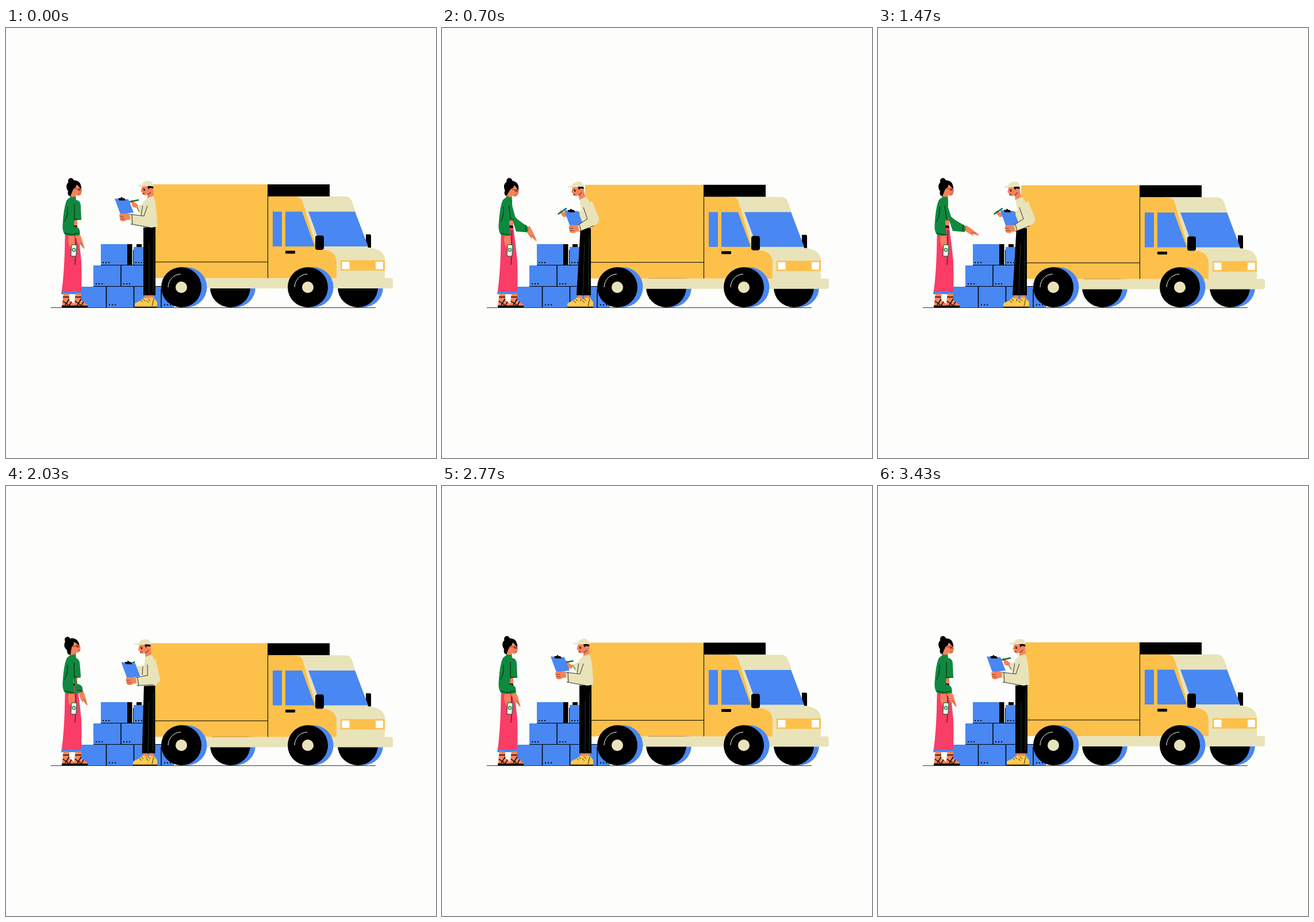
Recreate the animation shown at these times as an HTML page. Size 748x748 px, loop 3.46 s.

```html
<!DOCTYPE html>
<html lang="en">
<meta charset="utf-8">
<title>Delivery</title>
<style>
  html, body { margin: 0; width: 100%; height: 100%; overflow: hidden; background: #fdfefb; }
  svg { display: block; width: 100%; height: 100%; }
  .yellow { fill: #fdc04b; }
  .cream { fill: #e9e3ba; }
  .blue { fill: #4987f2; }
  .skin { fill: #f5835a; }
  .green { fill: #10883f; }
  .pink { fill: #f93d66; }
  .white { fill: #fff; }
  .line { fill: none; stroke: #000; }
</style>
<svg viewBox="0 0 748 748">
  <defs>
    <g id="wheel">
      <circle class="blue" cx="9.5" r="35"/>
      <circle r="35"/>
      <circle class="cream" r="10"/>
      <path d="M-23 0A23 23 0 0 1 -1 -23" fill="none" stroke="#fff"/>
    </g>
    <g id="farWheel"><circle class="blue" cx="9" r="35"/><circle r="35"/></g>
    <path id="dots" d="M0 0h2m3 0h2m3 0h2" stroke="#000" stroke-width="2"/>
    <g id="shoe">
      <path d="M0 485V480Q2 477 9 475L16 469L25 470L30 477V485Z" fill="#ffc94f"/>
      <path class="line" stroke-width="1.5" d="M0 485.5H30"/>
      <path class="line" stroke-width=".8" d="M11 474l4 4M14 471l4 4M24 471l-3 13"/>
    </g>
    <g id="sandal">
      <path class="skin" d="M3 462H13V473L23 481V484H1V476Z"/>
      <path d="M0 482.500L24 483V486H0Z"/>
      <path class="line" stroke-width="1.500" d="M2 468H13M2 475L12 482M13 471L6 482M17 476L13 483"/>
    </g>
  </defs>

  <path class="line" stroke-width=".8" d="M78 486.5H643"/>

  <use href="#farWheel" x="390" y="451"/>
  <use href="#farWheel" x="612" y="451"/>
  <g id="truck">
    <path d="M456 272H563V293H456ZM626 359H633Q635 359 635 362V382H626Z"/>
    <path class="cream" d="M500 293H590Q599 293 602 302L630 382Q659 384 659 404V440H500Z"/>
    <path class="cream" d="M330 435H670Q673 435 673 438V450Q673 453 670 453H330Z"/>
    <path class="yellow" d="M249 272H456V293H503Q513 293 516 302L541 386H553Q575 388 575 408V435H249Z"/>
    <path class="line" d="M249 407H455.5M455.5 272V435"/>
    <path class="blue" d="M464 319.5H480V380H464ZM486 319.5H515L537 380H486ZM526 319.5H607L630 380H548Z"/>
    <rect x="538" y="361" width="15" height="25" rx="4"/>
    <rect x="486" y="387.5" width="17" height="5" rx="1"/>
    <path class="yellow" d="M582 404H659V422H582Z"/>
    <path class="white" d="M584.5 406.5H597.5V419.5H584.5ZM643 406.5H656V419.5H643Z"/>
  </g>

  <path class="blue" d="M165 376H211V412H165ZM222 381H250V412H222ZM152 413H250V449H152ZM128 450H292V486H128Z"/>
  <path d="M211 376H219.5V412H211ZM227 376H236V381H227Z"/>
  <path class="line" d="M165 412.5H250M152 449.5H270M221.5 386V412"/>
  <path class="line" stroke-width="1.500" d="M200 413V449M174.500 450V486M222.500 450V486M270 454V486"/>
  <use href="#dots" x="168" y="408"/>
  <use href="#dots" x="225" y="408"/>
  <use href="#dots" x="156" y="445"/>
  <use href="#dots" x="204" y="445"/>
  <use href="#dots" x="179" y="481.500"/>
  <use href="#dots" x="275" y="481.500"/>

  <use href="#wheel" x="305" y="451"/>
  <use href="#wheel" x="525" y="451"/>

  <g id="man">
    <path class="skin" d="M241 462H248V474H241ZM248 462H257V474H248Z" data-to="M236 462H244V474H236ZM248 462H256V474H248Z"/>
    <use id="frontShoe" href="#shoe" x="224"/>
    <use href="#shoe" x="233"/>
    <path d="M239 346H260L260 465H239Z" data-to="M241 346H259L259 465H234Z"/>
    <path d="M257 360L256 460M249 375L249 463" data-to="M256 360L255 460M248 375L245 463" fill="none" stroke="#334d3a" stroke-width=".7"/>
    <path class="cream" d="M246 302L238 306L226 311L230 321L244 330Z" data-to="M248 316L240 318L214 319L218 328L242 334Z"/>
    <path class="line" stroke-width=".8" d="M227 311L232 319M238 308L235 326" data-to="M216 319L219 327M238 320L239 332"/>
    <g id="penHand">
      <path class="skin" d="M217 300Q220 297 222 302L229 307Q231 312 226 313L220 311Z"/>
      <path d="M213 303L231 299" stroke="#0b7140" stroke-width="2.500"/>
    </g>
    <path class="skin" d="M246 283H256L257 295L246 298Z" data-to="M237 284H247L250 297L239 300Z"/>
    <path class="cream" d="M245 296L256 292Q262 301 263 346L238 347L238 303Z" data-to="M239 299L249 294Q262 298 261 348L241 349L243 318Z"/>
    <g id="board">
      <path class="blue" d="M189 296.500L213 298L222 321L199 324Z"/>
      <path d="M195 296H199Q201 292 203 296H206L208 300H197Z"/>
      <path class="skin" d="M197 325Q199 321 205 323L212 322L216 325V333L210 334Q205 338 199 335L198 331Z"/>
      <path class="line" stroke-width=".5" d="M198 328H205M199 332H206"/>
    </g>
    <path class="cream" d="M259 301L263 339Q263 348 250 347L217 341L215 324L240 327L246 309Z" data-to="M261 301L273 330Q275 339 264 344L239 354L236 343L253 332L246 312Z"/>
    <path class="line" stroke-width=".8" d="M246 309L240 327L215 324M219 325L220 341M217 341L250 347" data-to="M246 312L253 332L236 343M239 342L242 353M239 354L264 344"/>
    <g id="manHead">
      <path class="skin" d="M237 275L234.500 284L237 286V289Q241 293 247 289L255 290L257 276Z"/>
      <path d="M246 275H256V279L250 278L248 282Z"/>
      <path class="line" stroke-width=".8" d="M238 279.500l4 1M238 288h3M246 290Q250 289 252 285"/>
      <circle cx="240.500" cy="282" r="1.200"/>
      <circle class="skin" cx="249.500" cy="282" r="2.500"/>
      <path class="cream" d="M228 275Q229 272 236 273Q238 266 247 266Q256 266 257 276Q246 273 237 276Z"/>
    </g>
  </g>

  <g id="woman">
    <path class="blue" d="M97 456H132L130 463H96Z"/>
    <use href="#sandal" x="97"/>
    <use href="#sandal" x="118"/>
    <path class="skin" d="M104 332H124V350H104Z"/>
    <path class="pink" d="M103 346L124 346Q128 375 131 405Q132 430 131 459L97 458Q101 425 102 390Z"/>
    <path d="M115 343L124 344V348L114 347Z"/>
    <path class="line" stroke-width=".8" d="M121.500 352V380M121 396L120 412"/>
    <g id="hand">
      <path class="skin" d="M-3 -4.500L7 -3.500L15 -2L25 0Q26 2 23 2.500L15 3L18 6L9 6L-3 4.500Z"/>
      <path class="line" stroke-width=".4" d="M12 2L20 1"/>
    </g>
    <path class="skin" d="M109 358H118L120 378Q116 386 110 379L108 370Z"/>
    <rect x="113.500" y="377" width="9" height="20" rx="2" fill="#f0fbee" stroke="#0d673a" stroke-width="1.200" transform="rotate(4 118 387)"/>
    <circle cx="118" cy="386" r="2.500" fill="none" stroke="#10883f" stroke-width="1.500"/>
    <path class="green" d="M112 288H121L122 300V334L117 336V344L120 360Q111 364 102 359Q97 353 99 336Q101 309 106 299L112 294Z"/>
    <path class="green" d="M112 300Q129 295 130 309L131 333L119 334L118 345Q131 346 128 360L119 362Z" data-to="M112 300Q121 297 122 312L127 328L133 333Q146 341 155 344L151 355Q130 353 122 345L118 332Z"/>
    <path class="line" stroke-width=".8" d="M119 306L119 333L131 333M118 358L128 357" data-to="M116 309L119 331L124 334M149 342L147 353"/>
    <path class="line" stroke-width=".8" d="M107 311Q108 326 102 337M102 357L119 360"/>
    <g id="womanHead">
      <path class="skin" d="M112 275H131L132 285L130 290Q125 294 121 290L120 294L112 293Z"/>
      <circle cx="113" cy="266" r="5"/>
      <path d="M105 275Q107 265 118 265Q130 265 131 278L130 280Q127 275 123 273Q121 279 118 279L115 285L112 293Q106 291 108 284Q105 280 105 275Z"/>
      <path d="M119 280H125M125 279H130V283H126Z" fill="none" stroke="#84251f" stroke-width=".8"/>
      <circle cx="127.500" cy="281" r="1"/>
      <path d="M126 288H130" stroke="#c92634"/>
    </g>
  </g>
</svg>
<script>
  const LOOP = 3460;
  const $ = id => document.getElementById(id);
  const place = (id, value) => $(id).setAttribute('transform', value);
  const lerp = (a, b, k) => a + (b - a) * k;

  // Smooth value of a list of [time, value] keys
  function track(t, keys) {
    const i = keys.findIndex(key => key[0] > t);
    if (i < 0) return keys.at(-1)[1];
    const [t0, a] = keys[i - 1], [t1, b] = keys[i];
    const u = (t - t0) / (t1 - t0);
    return lerp(a, b, u * u * (3 - 2 * u));
  }

  // Paths with a second pose, blended number by number
  const number = /-?\d+(\.\d+)?/g;
  const morphs = id => [...$(id).querySelectorAll('[data-to]')].map(el => {
    const from = el.getAttribute('d');
    const to = el.dataset.to.match(number).map(Number);
    return k => {
      let i = 0;
      el.setAttribute('d', from.replace(number, n => lerp(+n, to[i++], k)));
    };
  });
  const manShapes = morphs('man'), womanShapes = morphs('woman');

  const lean = [[0, 0], [600, 1], [1650, 1], [2400, 0]];
  const penDrop = [[0, 0], [2400, 0], [2770, 5], [3050, 0], [3250, 2], [3430, 0]];
  const reach = [[0, 0], [370, .85], [1030, .95], [1470, 1], [1600, 1], [2030, .2], [2400, 0]];
  const wrist = [[0, 62], [370, 61], [1030, 47], [1470, 27], [1600, 27], [2030, 63], [2400, 62]];
  const nod = [[0, 0], [370, 14], [1030, 4], [1470, 0], [2030, -13], [2650, 0]];

  function draw() {
    const t = performance.now() % LOOP;
    const bounce = .8 * (1 - Math.cos(t / LOOP * 12 * Math.PI));
    place('truck', `translate(0 ${bounce})`);

    const k = track(t, lean), drop = track(t, penDrop);
    manShapes.forEach(shape => shape(k));
    place('manHead', `translate(${-9 * k} ${k}) rotate(${-3 * k} 250 290)`);
    place('board', `translate(${23.5 * k} ${20.5 * k})`);
    place('penHand', `translate(${-11 * k - drop * .5} ${17 * k + drop}) rotate(${-22 * k} 223 306)`);
    place('frontShoe', `translate(${-6 * k} 0)`);

    const arm = track(t, reach);
    womanShapes.forEach(shape => shape(arm));
    place('hand', `translate(${lerp(125, 153, arm)} ${lerp(361, 348, arm)}) rotate(${track(t, wrist)})`);
    place('womanHead', `rotate(${track(t, nod)} 116 293)`);
    requestAnimationFrame(draw);
  }
  draw();
</script>
</html>
```
